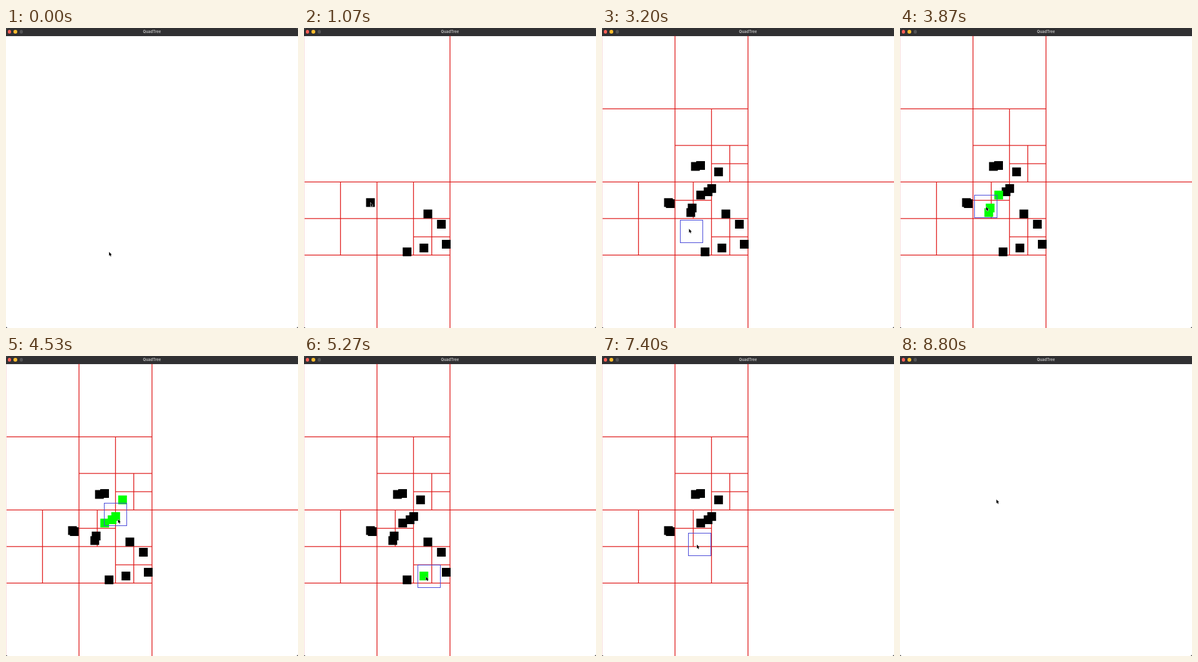
Write an HTML page with a canvas that moves like this. It is 468 by 480 pixels and loops after 8.94 s.

```html
<!DOCTYPE html>
<html lang="en">
<head>
<meta charset="utf-8">
<title>QuadTree</title>
<style>
  html, body { margin: 0; width: 468px; height: 480px; overflow: hidden; background: #000; }
  #window { position: relative; height: 480px; overflow: hidden; background: #fff; border-radius: 3px; }
  canvas { position: absolute; left: 0; top: 0; }
  header { position: absolute; width: 100%; height: 12.5px; background: #303032;
    color: #b8b8b8; font: bold 6px/12px Inter, sans-serif; text-align: center; }
  header i { position: absolute; top: 3.2px; width: 5.4px; height: 5.4px; border-radius: 50%; }
</style>
</head>
<body>
<div id="window">
  <header>QuadTree
    <i style="left:3px;background:#ff5f57"></i>
    <i style="left:12.4px;background:#febc2e"></i>
    <i style="left:21.8px;background:#525254"></i>
  </header>
  <canvas id="stage" width="468" height="480"></canvas>
</div>
<script>
const ctx = document.getElementById('stage').getContext('2d');
const LOOP = 8940, TILE = 14, QUERY = 36, LAG = 45;
const QUERY_ON = 2900, QUERY_OFF = 8800;

// Each tile: centre x, y, time added, time removed
const tiles = {
  a: [165.2, 358.2, 100, 6400], b: [192.2, 352, 300, 6720], c: [228, 346, 480, 6820],
  d: [220.2, 314, 640, 6920], e: [198.5, 297.5, 830, 7030], f: [106.5, 279.3, 1070, 7850],
  g: [109.5, 281, 1330, 7850], h: [149.7, 221.5, 1470, 8420], i: [158, 220, 1560, 8420],
  j: [186.8, 230.2, 1700, 8220], k: [175.8, 256.8, 1930, 7650], l: [170, 262, 2120, 7650],
  m: [158.2, 267.3, 2350, 7540], n: [144.5, 288, 2580, 7200], o: [142.3, 295.3, 2760, 7200]
};

// Cell address, tile whose arrival splits it, tile whose removal merges it
const splits = [
  'root b h', 'SW c f', 'SW.NE d k', 'SW.NE.SE e d', 'SW.NW f f',
  'NW h h', 'NW.SE i j', 'NW.SE.SE j j', 'SW.NE.NW o m'
].map(line => {
  const [address, first, last] = line.split(' ');
  let x = 234, y = 246.4, half = 234;
  if (address !== 'root') for (const quadrant of address.split('.')) {
    half /= 2;
    x += quadrant[1] === 'E' ? half : -half;
    y += quadrant[0] === 'S' ? half : -half;
  }
  return { x, y, half, on: tiles[first][2], off: tiles[last][3] };
});

// The pointer visits every tile to add and remove it, and roams in between: time, x, y
const stops = new Map();
for (const [x, y, on, off] of Object.values(tiles)) {
  stops.set(on, [x, y]);
  stops.set(off, [x, y]);
}
for (const [t, x, y] of [
  [3070, 150, 333], [3530, 113, 292], [3700, 134, 284], [3870, 138, 286],
  [4100, 160, 262], [4300, 158, 222], [4750, 200, 298], [5000, 222, 318],
  [5130, 210, 349], [5270, 195.5, 353], [5800, 161, 367], [6250, 162, 367],
  [6540, 154, 368.5], [6600, 157.5, 367], [7350, 156, 301], [7400, 152, 302],
  [8600, 154.5, 229.5]
]) stops.set(t, [x, y]);
const path = [...stops].sort((p, q) => p[0] - q[0]);

const alive = (t, on, off) => t >= on && t < off;

function pointerAt(t) {
  const next = path.findIndex(stop => stop[0] > t);
  if (next < 1) return path.at(next)[1];
  const [t0, [x0, y0]] = path[next - 1], [t1, [x1, y1]] = path[next];
  const k = (t - t0) / (t1 - t0);
  return [x0 + (x1 - x0) * k, y0 + (y1 - y0) * k];
}

function drawSplits(t) {
  ctx.beginPath();
  for (const { x, y, half, on, off } of splits) {
    if (!alive(t, on, off)) continue;
    ctx.moveTo(x - half, y);
    ctx.lineTo(x + half, y);
    ctx.moveTo(x, y - half);
    ctx.lineTo(x, y + half);
  }
  ctx.strokeStyle = '#df1c1c';
  ctx.lineWidth = 1.3;
  ctx.stroke();
  if (alive(t, splits[0].on, splits[0].off)) {
    ctx.fillStyle = '#f9dede';
    ctx.fillRect(0, 13, 1, 467);
  }
}

const arrow = new Path2D('M0 0V6.2L1.4 5L2.4 7.2L3.5 6.7L2.5 4.6H4.4Z');
function drawPointer([x, y]) {
  ctx.save();
  ctx.translate(x, y);
  ctx.strokeStyle = '#fff';
  ctx.lineWidth = 1;
  ctx.stroke(arrow);
  ctx.fillStyle = '#000';
  ctx.fill(arrow);
  ctx.restore();
}

function draw(t) {
  const [qx, qy] = pointerAt(t - LAG);
  const querying = alive(t, QUERY_ON, QUERY_OFF);
  const reach = (QUERY + TILE) / 2;
  ctx.clearRect(0, 0, 468, 480);
  // Keep the grid below the title bar
  ctx.save();
  ctx.beginPath();
  ctx.rect(0, 12.5, 468, 468);
  ctx.clip();
  drawSplits(t);
  ctx.restore();
  for (const [x, y, on, off] of Object.values(tiles)) {
    if (!alive(t, on, off)) continue;
    const hit = querying && Math.abs(x - qx) < reach && Math.abs(y - qy) < reach;
    ctx.fillStyle = hit ? '#0f0' : '#000';
    ctx.fillRect(x - TILE / 2, y - TILE / 2, TILE, TILE);
  }
  if (querying) {
    ctx.strokeStyle = '#4a4ad8';
    ctx.lineWidth = 1;
    ctx.strokeRect(Math.round(qx - QUERY / 2) + 0.5, Math.round(qy - QUERY / 2) + 0.5, QUERY, QUERY);
  }
  drawPointer(pointerAt(t));
}

const start = performance.now();
function tick() {
  draw((performance.now() - start) % LOOP);
  requestAnimationFrame(tick);
}
tick();
</script>
</body>
</html>
```
